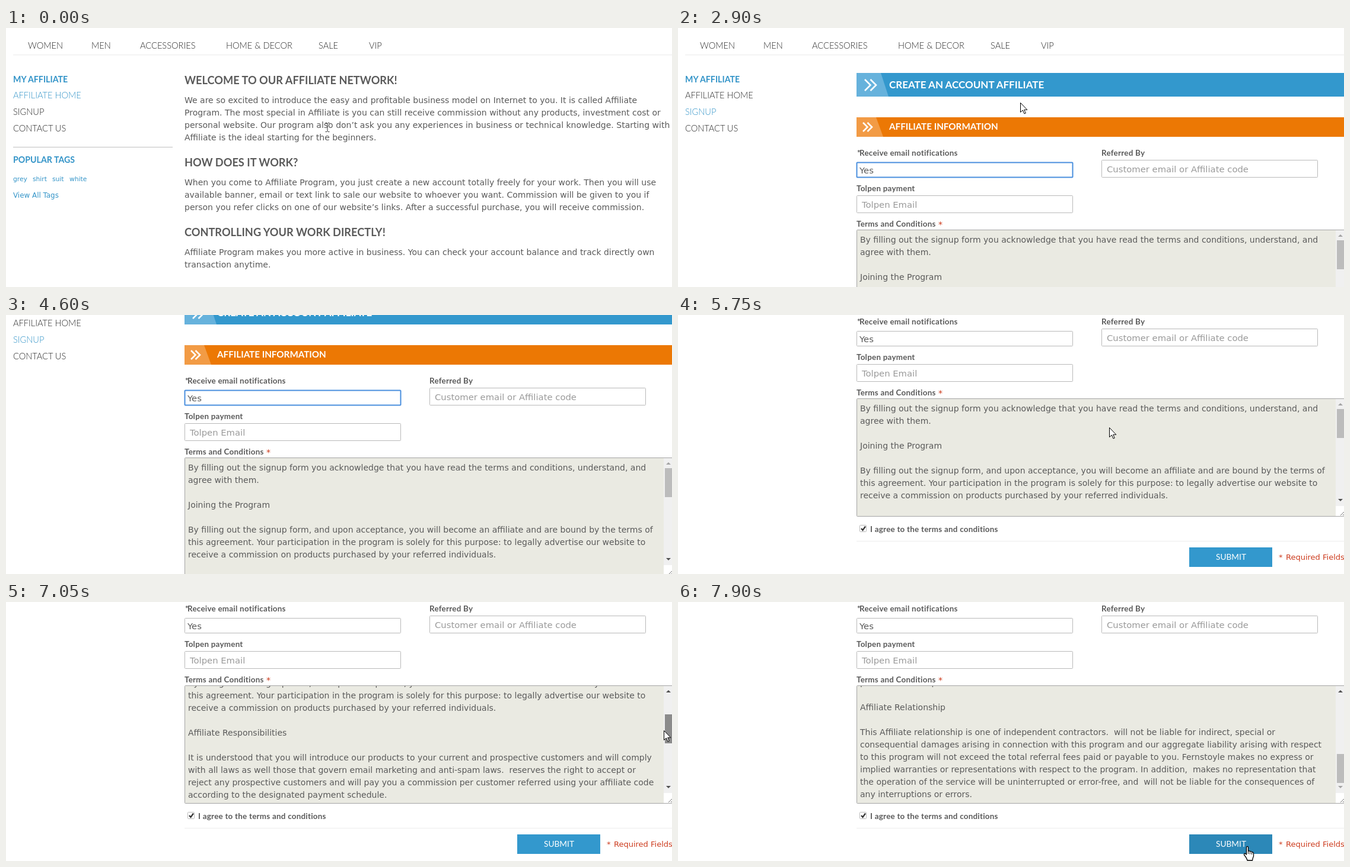
Animation of 1123 by 438 pixels, one loop 8 s. Source, as an HTML page:

```html
<!DOCTYPE html>
<html lang="en">
<head>
<meta charset="utf-8">
<title>Affiliate signup</title>
<style>
html, body { margin: 0; width: 100%; height: 100%; overflow: hidden; background: #fff; }
svg { display: block; }
text { white-space: pre; fill: #5a5a5a; }
.body { font: 14px "DejaVu Sans", sans-serif; }
.field { font: 14.8px "DejaVu Sans", sans-serif; }
.hint { fill: #9a9a9a; }
.tag { font: 10.7px "DejaVu Sans", sans-serif; }
.small { font: 11.9px "DejaVu Sans", sans-serif; }
.note { font: 13px "DejaVu Sans", sans-serif; }
.nav { font: 300 14.6px Lato, sans-serif; fill: #2a2a2a; }
.side { font: bold 14.2px Lato, sans-serif; }
.head { font: bold 18.2px Lato, sans-serif; }
.label { font: bold 13.4px Lato, sans-serif; letter-spacing: .25px; }
.title { font: bold 17px Lato, sans-serif; }
.subtitle { font: bold 15.2px Lato, sans-serif; }
.button { font: 13.7px Lato, sans-serif; }
.white { fill: #fff; }
.blue { fill: #3394c8; }
.red { fill: #cc3a1c; }
.box { fill: #fff; stroke: #b9b9b9; }
.area { fill: #eaeae2; stroke: #a5a5a5; }
.focus { stroke: #4a8fde; stroke-width: 2; }
.hover { fill: #3394c8; text-decoration: underline; }
.off { display: none; }
</style>
</head>
<body>
<svg id="stage" width="1123" height="438" viewBox="0 0 1123 438"></svg>
<script>
const LOOP = 8000, STEP = 50;

const text = (x, y, cls, s, id = '') =>
  `<text x="${x}" y="${y}" class="${cls}" id="${id}">${s}</text>`;
const lines = (x, y, rows) =>
  rows.map((s, i) => s && text(x, y + 21 * i, 'body', s)).join('');
const rect = (x, y, w, h, fill, id = '') =>
  `<rect x="${x}" y="${y}" width="${w}" height="${h}" fill="${fill}" id="${id}"/>`;
const frame = (x, y, w, h, cls, id = '') =>
  `<rect x="${x + .5}" y="${y + .5}" width="${w - 1}" height="${h - 1}" rx="1" class="${cls}" id="${id}"/>`;
const path = (d, fill, more = '') => `<path d="${d}" fill="${fill}" ${more}/>`;

const chevrons = (x, y, r) => [0, r].map(dx =>
  path(`M${x + dx} ${y}l${r} ${r}l${-r} ${r}`, 'none', 'stroke="#fff" stroke-width="2.6"')).join('');

const banner = (y, h, color, light, top, bottom) =>
  rect(301, y, 822, h, color) + path(`M301 ${y}H${top}L${bottom} ${y + h}H301z`, light);

const navBar = [[37, 'WOMEN'], [144, 'MEN'], [226, 'ACCESSORIES'], [371, 'HOME &amp; DECOR'], [527, 'SALE'], [612, 'VIP']]
  .map(([x, s]) => text(x, 35, 'nav', s)).join('') + rect(12, 45, 1111, 1, '#ebebeb');

const sideMenu = (active, ids) => text(12, 92, 'side blue', 'MY AFFILIATE') +
  ['AFFILIATE HOME', 'SIGNUP', 'CONTACT US'].map((s, i) =>
    text(12, 119 + 28 * i, 'nav' + (i === active ? ' blue' : ''), s, ids[i])).join('');

const welcomePage = navBar + sideMenu(0, ['', 'signup', 'contact']) +
  rect(12, 201, 269, 1, '#bfbfbf') +
  text(12, 228, 'side blue', 'POPULAR TAGS') +
  [[12, 'grey'], [45, 'shirt'], [78, 'suit'], [107, 'white']].map(([x, s]) => text(x, 259, 'tag blue', s)).join('') +
  text(12, 287, 'small blue', 'View All Tags') +
  text(301, 95, 'head', 'WELCOME TO OUR AFFILIATE NETWORK!') +
  lines(301, 127, [
    'We are so excited to introduce the easy and profitable business model on Internet to you. It is called Affiliate',
    'Program. The most special in Affiliate is you can still receive commission without any products, investment cost or',
    'personal website. Our program also don’t ask you any experiences in business or technical knowledge. Starting with',
    'Affiliate is the ideal starting for the beginners.']) +
  text(301, 234, 'head', 'HOW DOES IT WORK?') +
  lines(301, 266, [
    'When you come to Affiliate Program, you just create a new account totally freely for your work. Then you will use',
    'available banner, email or text link to sale our website to whoever you want. Commission will be given to you if',
    'person you refer clicks on one of our website’s links. After a successful purchase, you will receive commission.']) +
  text(301, 352, 'head', 'CONTROLLING YOUR WORK DIRECTLY!') +
  lines(301, 384, [
    'Affiliate Program makes you more active in business. You can check your account balance and track directly own',
    'transaction anytime.']);

const terms = [
  'By filling out the signup form you acknowledge that you have read the terms and conditions, understand, and',
  'agree with them.', '',
  'Joining the Program', '',
  'By filling out the signup form, and upon acceptance, you will become an affiliate and are bound by the terms of',
  'this agreement. Your participation in the program is solely for this purpose: to legally advertise our website to',
  'receive a commission on products purchased by your referred individuals.', '',
  'Affiliate Responsibilities', '',
  'It is understood that you will introduce our products to your current and prospective customers and will comply',
  'with all laws as well those that govern email marketing and anti-spam laws.  reserves the right to accept or',
  'reject any prospective customers and will pay you a commission per customer referred using your affiliate code',
  'according to the designated payment schedule.', '',
  'You agree to present our products in a fair and honest way at all times. Any misleading claims about prices,',
  'delivery or service, and any offers that were not approved by us in writing before they are published, are',
  'prohibited in the plan.', '',
  'Affiliate Relationship', '',
  'This Affiliate relationship is one of independent contractors.  will not be liable for indirect, special or',
  'consequential damages arising in connection with this program and our aggregate liability arising with respect',
  'to this program will not exceed the total referral fees paid or payable to you. Fernstoyle makes no express or',
  'implied warranties or representations with respect to the program. In addition,  makes no representation that',
  'the operation of the service will be uninterrupted or error-free, and  will not be liable for the consequences of',
  'any interruptions or errors.'];

const formPage = navBar + sideMenu(1, ['', '', '']) +
  banner(76, 40, '#3398cd', '#66b2dc', 342, 355) + chevrons(315, 87, 9.5) +
  text(356, 102, 'title white', 'CREATE AN ACCOUNT AFFILIATE') +
  banner(151, 33, '#ec7804', '#f29b45', 334, 346) + chevrons(312, 160, 7.5) +
  text(356, 172, 'subtitle white', 'AFFILIATE INFORMATION') +
  text(302, 216, 'label', '*') + text(306, 216, 'label', 'Receive email notifications') +
  frame(301, 227, 365, 26, 'box', 'notify') + text(306, 246, 'field', 'Yes') +
  text(714, 216, 'label', 'Referred By') +
  frame(714, 223, 365, 30, 'box') + text(723, 244, 'field hint', 'Customer email or Affiliate code') +
  text(301, 276, 'label', 'Tolpen payment') +
  frame(301, 283, 365, 30, 'box', 'payment') + text(310, 304, 'field hint', 'Tolpen Email') +
  text(301, 336, 'label', 'Terms and Conditions') + text(439, 337, 'body red', '*') +
  frame(301, 341, 831, 200, 'area') +
  `<clipPath id="view"><path d="M302 342H1109V540H302z"/></clipPath>
   <g clip-path="url(#view)"><g id="terms">${lines(307, 363, terms)}</g></g>` +
  rect(1109, 342, 14, 182, '#f0f0f0') + rect(1111, 359, 12, 49, '#bcbcbc', 'thumb') +
  path('M1113 353l4-4l4 4z', '#505050', 'id="up"') + path('M1113 511h8l-4 4z', '#505050', 'id="down"') +
  rect(1109, 523, 14, 17, '#fff') + path('M1117 539l6-6M1121 539l2-2', 'none', 'stroke="#777"') +
  frame(306, 555, 12, 12, 'box') +
  path('M309 561l2.5 3l4.5-6.5', 'none', 'stroke="#333" stroke-width="2.2"') +
  text(324, 567, 'label', 'I agree to the terms and conditions') +
  rect(301, 582, 822, 1, '#ececec') +
  rect(862, 593, 140, 33, '#3398cd', 'submit') + text(907, 614, 'button white', 'SUBMIT') +
  text(1013, 614, 'note red', '*') + text(1025, 614, 'note red', 'Required Fields');

const ink = 'stroke="#000" stroke-linejoin="round"';
const pointers =
  `<g id="arrow">${path('M.5 .5V16.5L4.3 13L7 19L9.3 18L6.7 12.3H11.8z', '#fff', ink)}</g>
   <g id="beam">${path('M-3.5 -7.5H-1L0 -6.5L1 -7.5H3.5M0 -6.5V6.5M-3.5 7.5H-1L0 6.5L1 7.5H3.5', 'none', 'stroke="#333"')}</g>
   <g id="hand">${path('M-1.5 14V2Q-1.5 .5 0 .5T1.5 2V8.5Q3 7 4.5 9Q6.5 8 7.5 10Q10.5 9.5 10.5 13V17Q9 20 8.5 24H0Q-1 20 -5.5 14.5Q-5.5 11.5 -3.5 12.5z', '#fff', ink + ' stroke-width="1.3"')}
     ${path('M1.5 8.5V13M4.5 9.5V13.5M7.5 10.5V14', 'none', ink)}</g>`;

stage.innerHTML = `<g id="welcome">${welcomePage}</g><g id="form">${formPage}</g>
  <circle id="ring" r="11" fill="none" stroke="#f6f000" stroke-width="3"/><g id="pointer">${pointers}</g>`;

const $ = id => document.getElementById(id);
const show = (id, on) => $(id).classList.toggle('off', !on);
const move = (id, x, y) => $(id).setAttribute('transform', `translate(${x} ${y})`);

// [time, x, y, pointer shape from this time on]
const route = [
  [0, 542, 168, 'beam'], [150, 542, 168, 'beam'], [250, 557, 170, 'beam'], [600, 300, 172, 'arrow'],
  [850, 100, 168, 'hand'], [950, 60, 162, 'hand'], [1000, 40, 145, 'hand'], [1100, 35, 139, 'hand'],
  [1250, 35, 139, 'hand'], [1350, 33, 138, 'hand'], [1850, 33, 138, 'hand'], [1900, 70, 142, 'arrow'],
  [2200, 301, 152, 'beam'], [2350, 397, 154, 'beam'], [2550, 397, 154, 'arrow'], [2900, 577, 126, 'arrow'],
  [3150, 577, 126, 'arrow'], [3350, 569, 179, 'arrow'], [3700, 569, 179, 'arrow'], [4000, 535, 142, 'beam'],
  [4400, 484, 191, 'beam'], [4600, 484, 191, ''], [5250, 484, 191, 'arrow'], [5750, 727, 190, 'arrow'],
  [6050, 702, 186, 'arrow'], [6400, 479, 284, 'arrow'], [6600, 479, 284, 'arrow'], [6850, 1109, 186, 'arrow'],
  [6900, 1109, 186, 'arrow'], [7050, 1109, 217, 'arrow'], [7400, 1109, 285, 'arrow'], [7850, 975, 400, 'hand'],
  [7900, 960, 413, 'hand'], [LOOP, 960, 413, 'hand']];
const termsScroll = [[0, 0], [6900, 0], [7050, 126], [7400, 400], [LOOP, 400]];

function at(keys, t) {
  const i = keys.findIndex(k => k[0] > t), a = keys[i - 1], b = keys[i];
  const f = (t - a[0]) / (b[0] - a[0]);
  return a.slice(1).map((v, j) => typeof v === 'number' ? v + (b[j + 1] - v) * f : v);
}

function draw(now) {
  const t = Math.floor(now % LOOP / STEP) * STEP;
  const within = (a, b) => t >= a && t < b;

  show('welcome', t < 2550);
  show('form', t >= 2550);
  move('form', 0, t < 3550 ? 0 : t < 5250 ? -100 : -200);
  $('contact').classList.toggle('hover', within(850, 1000));
  $('signup').classList.toggle('hover', within(1000, 1900));
  $('notify').classList.toggle('focus', t < 4950);
  $('payment').classList.toggle('focus', within(4950, 5250));

  const [scroll] = at(termsScroll, t);
  move('terms', 0, -Math.round(scroll));
  move('thumb', 0, Math.round(scroll * 98 / 400));
  $('thumb').setAttribute('fill', within(6900, 7450) ? '#8b8b8b' : '#bcbcbc');
  $('up').setAttribute('fill', scroll > 0 ? '#505050' : '#a3a3a3');
  $('down').setAttribute('fill', scroll < 400 ? '#505050' : '#a3a3a3');
  $('submit').setAttribute('fill', t >= 7850 ? '#2c88b8' : '#3398cd');

  const [x, y, shape] = at(route, t);
  move('pointer', Math.round(x), Math.round(y));
  for (const id of ['arrow', 'beam', 'hand']) show(id, id === shape);
  show('ring', within(1650, 1700) || within(4950, 5000));
  move('ring', Math.round(x) - 12, Math.round(y) - 3);
}

const start = performance.now();
function tick() {
  draw(performance.now() - start);
  requestAnimationFrame(tick);
}
tick();
</script>
</body>
</html>
```
